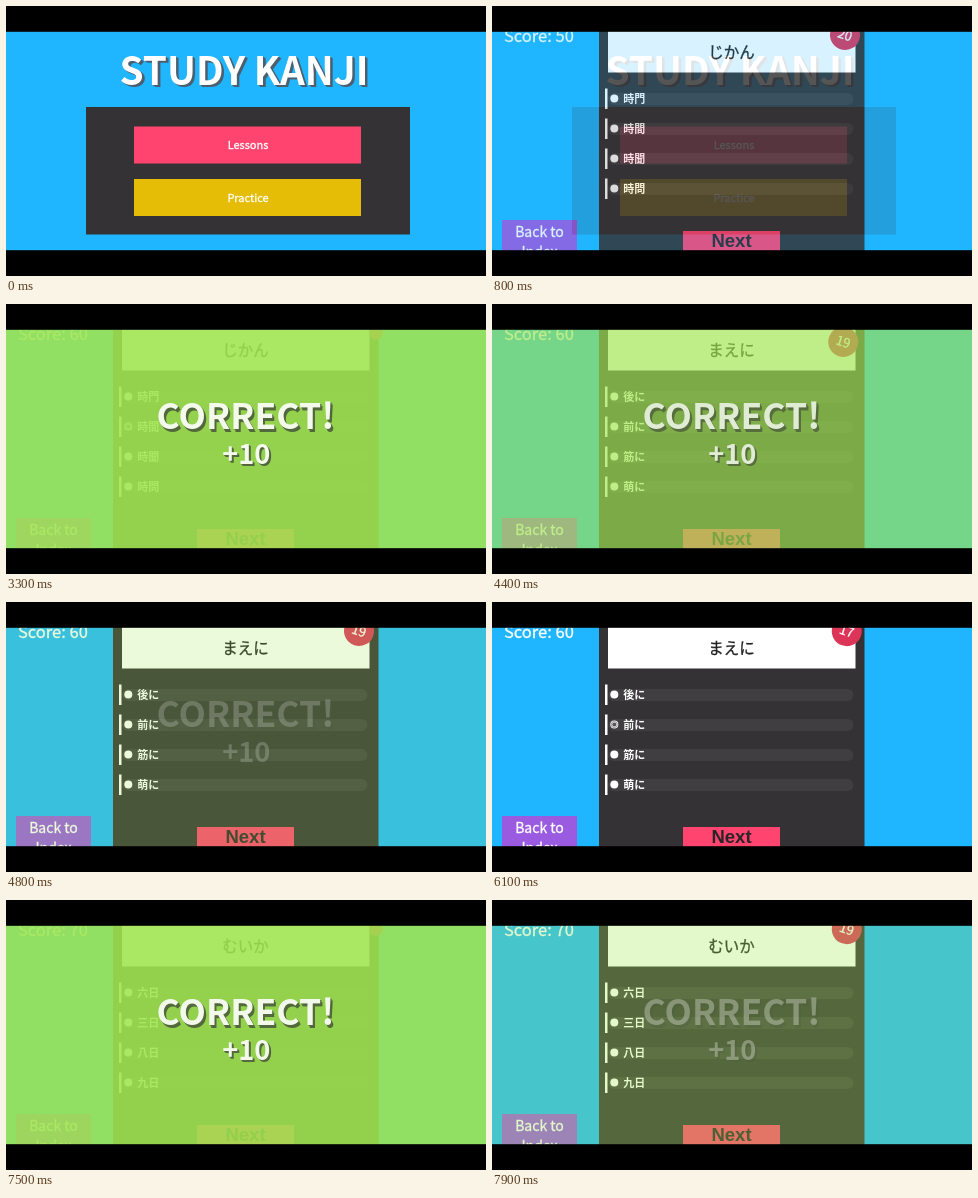
Write an HTML page that moves like this. It is 480 px wide and 270 px high and loops after 8000 ms.

```html
<!DOCTYPE html>
<html lang="en">
<head>
<meta charset="utf-8">
<title>Study Kanji</title>
<style>
  html, body { margin: 0; width: 100%; height: 100%; overflow: hidden; background: #000; }
  svg { display: block; width: 100vw; height: 100vh; }
  text {
    font-family: "Noto Sans CJK JP", "Noto Sans CJK", "Noto Sans", sans-serif;
    fill: #fff; stroke: #fff; stroke-width: .3;
  }
  .mid { text-anchor: middle; }
  .bold { font-weight: 700; }
  .bold text, text.bold { stroke: none; }
  #reading { fill: #222; stroke: #222; }
  #next { fill: #2a2527; font-family: "Liberation Sans", Arial, sans-serif; }
  .pink { fill: #ff4470; }
  .sky { fill: #1fb6ff; }
  .panel { fill: #343234; }
</style>
</head>
<body>
<svg viewBox="0 0 480 270" lang="ja">
  <rect class="sky" width="480" height="270"/>

  <g id="quiz">
    <text id="score" x="12" y="35.5" font-size="16.5"></text>
    <rect x="10" y="214" width="75" height="40" fill="#9a5be0"/>
    <g class="mid" font-size="14">
      <text x="47.5" y="231">Back to</text>
      <text x="47.5" y="251">Index</text>
    </g>
    <rect class="panel" x="107" y="20" width="265.5" height="240"/>
    <rect x="116" y="20" width="247.5" height="46.5" fill="#fff"/>
    <text id="reading" class="mid" x="239.5" y="52" font-size="15.5"></text>
    <g id="options"></g>
    <rect class="pink" x="191" y="225" width="97" height="30"/>
    <text id="next" class="mid bold" x="239.5" y="241" font-size="18.5">Next</text>
    <g id="badge">
      <circle r="15" fill="#dc3558"/>
      <text id="count" class="mid" y="4.5" font-size="13"></text>
    </g>
  </g>

  <rect id="flash" width="480" height="270" fill="#a0e650"/>
  <g id="praise" class="mid bold"></g>

  <g id="menu">
    <rect class="sky" width="480" height="270"/>
    <g id="title" class="mid bold"></g>
    <rect class="panel" x="80" y="101" width="324" height="127.5"/>
    <rect class="pink" x="128" y="120.5" width="227" height="37"/>
    <rect x="128" y="173" width="227" height="37" fill="#e5bd06"/>
    <g class="mid" font-size="11">
      <text x="242" y="143">Lessons</text>
      <text x="242" y="195.5">Practice</text>
    </g>
  </g>

  <rect width="480" height="25.8"/>
  <rect y="244.2" width="480" height="25.8"/>
</svg>

<script>
const LOOP = 8000;
const $ = id => document.getElementById(id);

const questions = [
  { from: 0, reading: 'じかん', options: ['時門', '時間', '時聞', '時問'], picked: 2400 },
  { from: 3900, reading: 'まえに', options: ['後に', '前に', '筋に', '萌に'], picked: 5600 },
  { from: 7300, reading: 'むいか', options: ['六日', '三日', '八日', '九日'], picked: Infinity }
];
const scores = [{ from: 0, value: 50 }, { from: 2850, value: 60 }, { from: 6350, value: 70 }];
// An empty value parks the badge, small, at the panel's edge.
const ticks = [
  { from: -1000, value: 20 }, { from: 1180, value: 19 }, { from: 2180, value: 18 },
  { from: 2850, value: '' },
  { from: 4080, value: 19 }, { from: 5080, value: 18 }, { from: 6080, value: 17 },
  { from: 6350, value: '' },
  { from: 7880, value: 19 }
];

const fadeIn = [[0, 0], [100, .25], [250, .66], [450, .89], [800, 1]];
const flashOut = [[0, 1], [100, .89], [200, .67], [500, .3], [800, 0]];
const praiseOut = [[0, 1], [200, .77], [500, .3], [800, 0]];
const answers = [{ from: 2850, leave: 4200 }, { from: 6350, leave: 7400 }];

const latest = (list, t) => list.filter(item => item.from <= t).pop();

function track(points, t) {
  const next = points.findIndex(p => p[0] > t);
  if (next === 0) return points[0][1];
  if (next < 0) return points[points.length - 1][1];
  const [t0, a] = points[next - 1], [t1, b] = points[next];
  return a + (b - a) * (t - t0) / (t1 - t0);
}

function shadowText(group, label, x, y, size, drop, shade) {
  const text = (d, fill) =>
    `<text x="${x + d}" y="${y + d}" font-size="${size}" style="fill:${fill}">${label}</text>`;
  group.innerHTML += text(drop, shade) + text(drop / 2, shade) + text(0, '#fff');
}

shadowText($('title'), 'STUDY KANJI', 238, 78.5, 38.7, 2.6, '#4b5f70');
shadowText($('praise'), 'CORRECT!', 239.5, 125.3, 35.6, 2.2, '#4c5b3c');
shadowText($('praise'), '+10', 240.3, 160, 27.3, 2, '#4c5b3c');

$('options').innerHTML = [0, 1, 2, 3].map(i => `
  <g transform="translate(0 ${93 + 30 * i})">
    <rect x="116" y="-6" width="245.5" height="12" rx="6" fill="#403e40"/>
    <rect x="113" y="-10.5" width="2.5" height="20.5" fill="#fff"/>
    <circle cx="122.3" cy="-.5" r="4" fill="#fff"/>
    <g class="dot" visibility="hidden">
      <circle cx="122.3" cy="-.5" r="3" fill="#fff" stroke="#777" stroke-width=".8"/>
      <circle cx="122.3" cy="-.5" r="2" fill="#555"/>
    </g>
    <text class="label bold" x="131.2" y="4" font-size="11"></text>
  </g>`).join('');
const labels = [...document.querySelectorAll('.label')];
const dots = [...document.querySelectorAll('.dot')];

function setText(node, value) {
  if (node.textContent !== String(value)) node.textContent = value;
}

// Each tick sends the badge once around a small loop.
function drawBadge(t) {
  const tick = latest(ticks, t);
  const angle = 2 * Math.PI * Math.min((t - tick.from) / 600, 1);
  const x = 353 + 8 * Math.sin(angle), y = 29 + 4.5 * (1 - Math.cos(angle));
  setText($('count'), tick.value);
  $('badge').setAttribute('transform', tick.value
    ? `translate(${x} ${y}) rotate(18)`
    : 'translate(370 29) scale(.45)');
}

function drawQuiz(t) {
  const question = latest(questions, t);
  setText($('score'), 'Score: ' + latest(scores, t).value);
  setText($('reading'), question.reading);
  question.options.forEach((option, i) => setText(labels[i], option));
  dots[1].setAttribute('visibility', t >= question.picked ? 'visible' : 'hidden');
}

function drawAnswer(t) {
  const answer = latest(answers, t);
  const level = out => !answer ? 0
    : t < answer.leave ? track(fadeIn, t - answer.from) : track(out, t - answer.leave);
  $('flash').setAttribute('opacity', level(flashOut));
  $('praise').setAttribute('opacity', level(praiseOut));
}

function draw(now) {
  const t = now % LOOP;
  $('menu').setAttribute('opacity', track([[60, 1], [950, 0]], t));
  drawQuiz(t);
  drawBadge(t);
  drawAnswer(t);
}

const start = performance.now();
function frame() {
  draw(performance.now() - start);
  requestAnimationFrame(frame);
}
frame();
</script>
</body>
</html>
```
